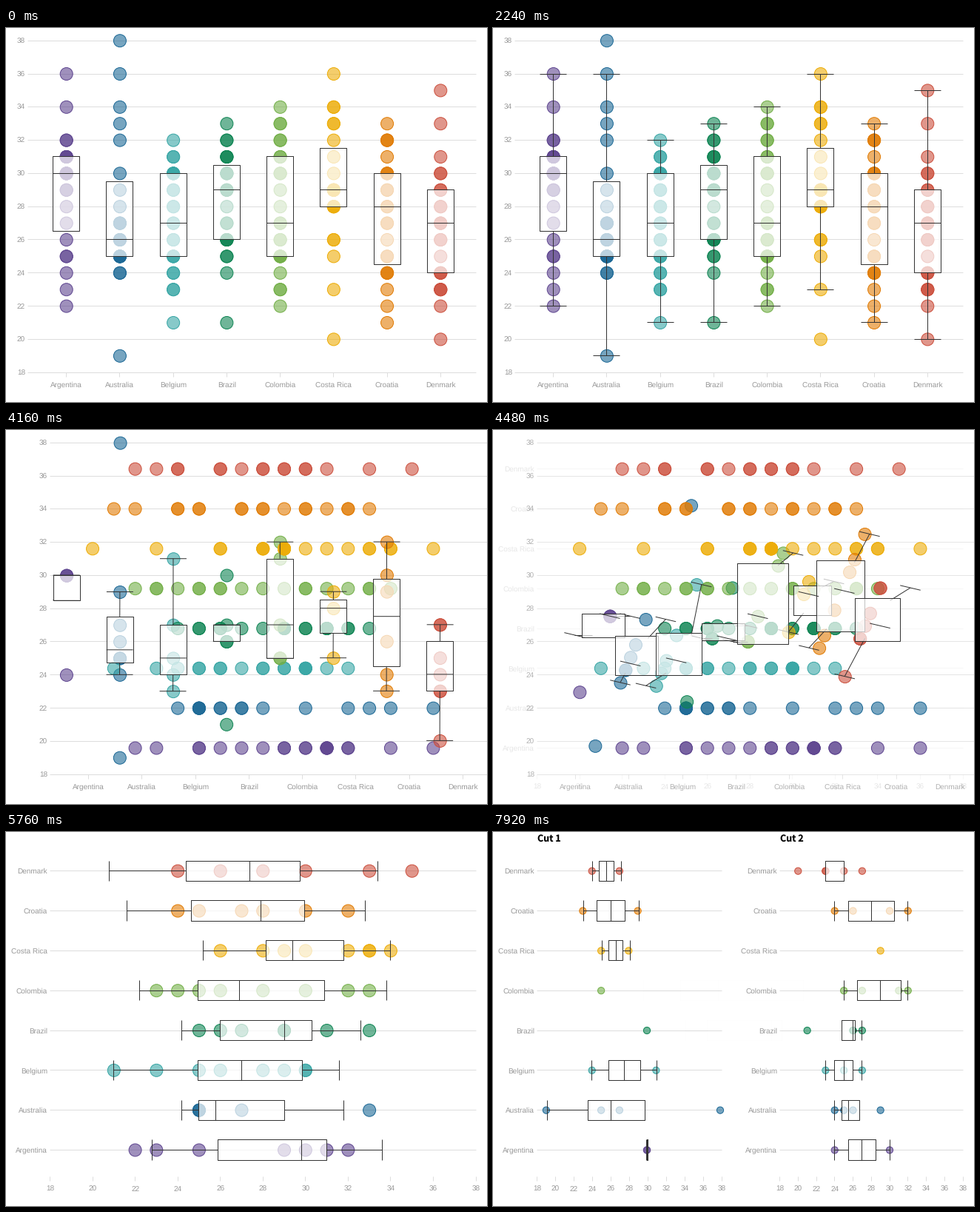
Write a matplotlib script that moves like this. It is 650 px wide and 505 px high and loops after 8000 ms.

```python
import numpy as np
import matplotlib.pyplot as plt
from matplotlib.animation import FuncAnimation
from matplotlib.collections import LineCollection, PolyCollection
from matplotlib.colors import to_rgba

W, H, DPI = 650, 505, 100
PX = 72 / DPI
STEP, LOOP = 80, 8000
plt.rcParams["text.hinting"] = "no_hinting"

COUNTRIES = ["Argentina", "Australia", "Belgium", "Brazil",
             "Colombia", "Costa Rica", "Croatia", "Denmark"]
COLORS = ["#5F4690", "#1D6996", "#38A6A5", "#0F8554",
          "#73AF48", "#EDAD08", "#E17C05", "#CC503E"]
SQUAD = 23

# Visible start of each stage and how far its clock already runs then.
STARTS = [1360, 2800, 4160, 5440, 7120]
LEADS = [70, 97, 70, 48, 84]
DURATION = 1000

LEFT, FULL, HALF, LEFT2 = 59.5, 575.5, 247.5, 387.5
INK, LABEL, GRID = "#333333", "#999999", "#dddddd"


def spread(n, points):
    """n whole ages along a curve through evenly spaced key points."""
    knots = np.linspace(0, 1, len(points))
    return list(np.rint(np.interp(np.linspace(0, 1, n), knots, points)))


# Attackers, as shown in the two cuts.
CUT1 = [[30, 30], [19, 25, 27, 38], [24, 31], [30],
        [25], [25, 28], [23, 29], [24, 27]]
CUT2 = [[24, 30], [24, 25, 26, 29], [23, 25, 27], [21, 26, 26, 27],
        [25, 27, 31, 32], [29], [24, 26, 30, 32], [20, 23, 23, 25, 27]]
FRONT = [a + b for a, b in zip(CUT1, CUT2)]

# Midfielders: head count and five-number summary.
MID_SIZE = [7, 5, 8, 7, 8, 8, 6, 6]
MID_KEYS = [(22, 23.5, 29, 31, 32), (25, 25, 25, 27, 33),
            (21, 24.75, 27, 29.25, 30), (25, 26, 29, 29.5, 33),
            (23, 24.75, 26.5, 30.5, 33), (26, 28.75, 31, 33, 34),
            (24, 25.25, 27.5, 29.75, 32), (24, 26, 29, 32.75, 35)]
MIDDLE = [spread(n, keys) for n, keys in zip(MID_SIZE, MID_KEYS)]

# Everyone else fills the squad along a rough age curve.
REST_KEYS = [(25, 28, 31, 31, 36), (24, 27.5, 36), (24, 28.5, 32), (24, 30, 32),
             (22, 34), (20, 28, 29, 29.5, 36), (21, 28, 33), (22, 27.5, 31)]
OTHERS = [m + spread(SQUAD - len(f) - len(m), keys)
          for f, m, keys in zip(FRONT, MIDDLE, REST_KEYS)]
ALL = [f + o for f, o in zip(FRONT, OTHERS)]


def ease(u):
    u = min(max(u, 0), 1)
    return 4 * u ** 3 if u < 0.5 else 1 - 4 * (1 - u) ** 3


def lerp(a, b, p):
    return a + (b - a) * p


def col_x(i):
    return 81.7 + 72.23 * i


def row_y(i):
    return 429.5 - 53.83 * i


def age_y(v):
    return 17.2 + 22.4 * (38 - v)


def tall(i):
    return lambda v, off: (col_x(i) + 18 * off, age_y(v))


def wide(i, x0=LEFT, width=FULL):
    return lambda v, off: (x0 + (v - 18) * width / 20, row_y(i) + 13.6 * off)


def left_cut(i):
    return wide(i, LEFT, HALF)


def right_cut(i):
    return wide(i, LEFT2, HALF)


def quartiles(ages):
    return np.percentile(ages, [25, 50, 75])


def shape(at, ages, box, reach, upright, band):
    """Box corners, median, two caps and two whiskers as point pairs."""
    q1, mid, q3 = box
    span = reach * (q3 - q1)
    inside = [v for v in ages if q1 - span < v < q3 + span] + [q1, q3]
    lo, hi = min(inside), max(inside)
    a, b = (q3, q1) if upright else (q1, q3)
    return np.array([at(a, -band), at(b, band), at(mid, -band), at(mid, band),
                     at(lo, -band), at(lo, band), at(hi, -band), at(hi, band),
                     at(q1, 0), at(lo, 0), at(q3, 0), at(hi, 0)])


def shapes(view, groups, boxes=None, reach=1.0, upright=False, band=1):
    boxes = boxes or [quartiles(g) for g in groups]
    return [shape(view(i), g, box, reach, upright, band) if len(g) > 1 else None
            for i, (g, box) in enumerate(zip(groups, boxes))]


TALL_ALL = shapes(tall, ALL, reach=1.5, upright=True)
TALL_FRONT = shapes(tall, FRONT, reach=1.5, upright=True)
WIDE_ALL = shapes(wide, ALL)
WIDE_MIDDLE = shapes(wide, MIDDLE, [keys[1:4] for keys in MID_KEYS])
BOX_CUT1 = shapes(left_cut, CUT1)
BOX_CUT2 = shapes(right_cut, CUT2)
FLAT_CUT2 = shapes(right_cut, CUT2, band=0)


def no_caps(s):
    s = s.copy()
    for k in (4, 6):
        s[k:k + 2] = s[k:k + 2].mean(axis=0)
    return s


BARE = [no_caps(s) for s in TALL_ALL]


def spots(view, groups):
    return [(i, np.array(view(i)(v, 0))) for i, g in enumerate(groups) for v in g]


fig = plt.figure(figsize=(W / DPI, H / DPI), dpi=DPI, facecolor="white")
ax = fig.add_axes((0, 0, 1, 1))


def label(x, y, text, ha="center", alpha=1.0):
    ax.text(x, y + 3.6, text, ha=ha, va="baseline", color=LABEL, alpha=alpha,
            family="Liberation Sans", fontsize=10 * PX)


def title(x, text, alpha=1.0):
    ax.text(x, 13, text, va="baseline", color="black", alpha=alpha, weight="bold",
            family="Noto Sans CJK JP", fontsize=12.5 * PX)


def strokes(segments, color, z):
    # Half a pixel back, so that snapping picks the pixel each line starts in.
    ax.add_collection(LineCollection(np.array(segments) - 0.5, colors=[color],
                                     linewidths=PX, zorder=z))


def tall_axes(dx=0, alpha=1.0):
    lines = []
    for v in range(18, 39, 2):
        y = age_y(v)
        lines.append([(29.5 + dx, y), (635 + dx, y)])
        label(26 + dx, y, str(v), "right", alpha)
    for i, name in enumerate(COUNTRIES):
        x = col_x(i) + dx
        lines.append([(x, 465), (x, 471)])
        label(x, 481, name, alpha=alpha)
    strokes(lines, to_rgba(GRID, alpha), 1)


def wide_axes(x0=LEFT, width=FULL, alpha=1.0):
    lines = []
    for v in range(18, 39, 2):
        x = x0 + (v - 18) * width / 20
        lines.append([(x, 465), (x, 471)])
        label(x, 481, str(v), alpha=alpha)
    for i, name in enumerate(COUNTRIES):
        y = row_y(i)
        lines.append([(x0, y), (x0 + width, y)])
        label(x0 - 3.5, y, name, "right", alpha)
    strokes(lines, to_rgba(GRID, alpha), 1)


def draw_dots(dots, size=17):
    dots = sorted(dots, key=lambda d: d[0])
    xy = np.array([d[1] for d in dots])
    ax.scatter(xy[:, 0], xy[:, 1], s=(size * PX) ** 2, linewidths=PX, zorder=2,
               facecolors=[to_rgba(COLORS[i], 0.6) for i, _ in dots],
               edgecolors=[COLORS[i] for i, _ in dots])


def draw_boxes(items, whiskers=True, alpha=1.0):
    items = [s for s in items if s is not None]
    if not items:
        return
    ink = to_rgba(INK, alpha)
    if whiskers:
        strokes([s[k:k + 2] for s in items for k in (4, 6, 8, 10)], ink, 3)
    rects = []
    for s in items:
        (x0, y0), (x1, y1) = s[:2] - 0.5
        rects.append([(x0, y0), (x1, y0), (x1, y1), (x0, y1)])
    ax.add_collection(PolyCollection(rects, facecolors=[to_rgba("white", 0.7 * alpha)],
                                     edgecolors=[ink], linewidths=PX, zorder=4))
    strokes([s[2:4] for s in items], ink, 5)


def blend(a, b, p):
    return [lerp(s, e, p) for s, e in zip(a, b) if s is not None and e is not None]


def whisker_stage(p, shown=True):
    tall_axes()
    draw_dots(spots(tall, ALL))
    draw_boxes(blend(BARE, TALL_ALL, p), whiskers=shown)


def front_stage(p):
    tall_axes()
    draw_dots(spots(tall, FRONT))
    draw_boxes(blend(TALL_ALL, TALL_FRONT, p))


def turn_stage(p):
    if p < 1:
        tall_axes(30, 1 - p)
    wide_axes(alpha=p)
    moving = [(i, lerp(a, b, p)) for (i, a), (_, b)
              in zip(spots(tall, FRONT), spots(wide, FRONT))]
    draw_dots(spots(wide, OTHERS) + moving)
    draw_boxes(blend(TALL_FRONT, WIDE_ALL, p))


def middle_stage(p):
    wide_axes()
    draw_dots(spots(wide, MIDDLE))
    draw_boxes(blend(WIDE_ALL, WIDE_MIDDLE, p))


def split_stage(p):
    title(LEFT, "Cut 1")
    title(LEFT2, "Cut 2", p)
    wide_axes(LEFT, lerp(FULL, HALF, p))
    wide_axes(LEFT2, HALF, p)
    draw_dots(spots(left_cut, CUT1) + spots(right_cut, CUT2), 9.2)
    leaving = [s for s, e in zip(WIDE_MIDDLE, BOX_CUT1) if e is None]
    draw_boxes(leaving, alpha=1 - p)
    draw_boxes(blend(WIDE_MIDDLE, BOX_CUT1, p) + blend(FLAT_CUT2, BOX_CUT2, p))


STAGES = [whisker_stage, front_stage, turn_stage, middle_stage, split_stage]


def draw(n):
    t = n * STEP
    ax.clear()
    ax.set_xlim(0, W)
    ax.set_ylim(H, 0)
    ax.axis("off")
    k = sum(t >= s for s in STARTS) - 1
    if k < 0:
        whisker_stage(0, shown=False)
    else:
        STAGES[k](ease((t - STARTS[k] + LEADS[k]) / DURATION))
    return []


anim = FuncAnimation(fig, draw, frames=LOOP // STEP, interval=STEP,
                     repeat=True, repeat_delay=0, blit=False)
plt.show()
```
